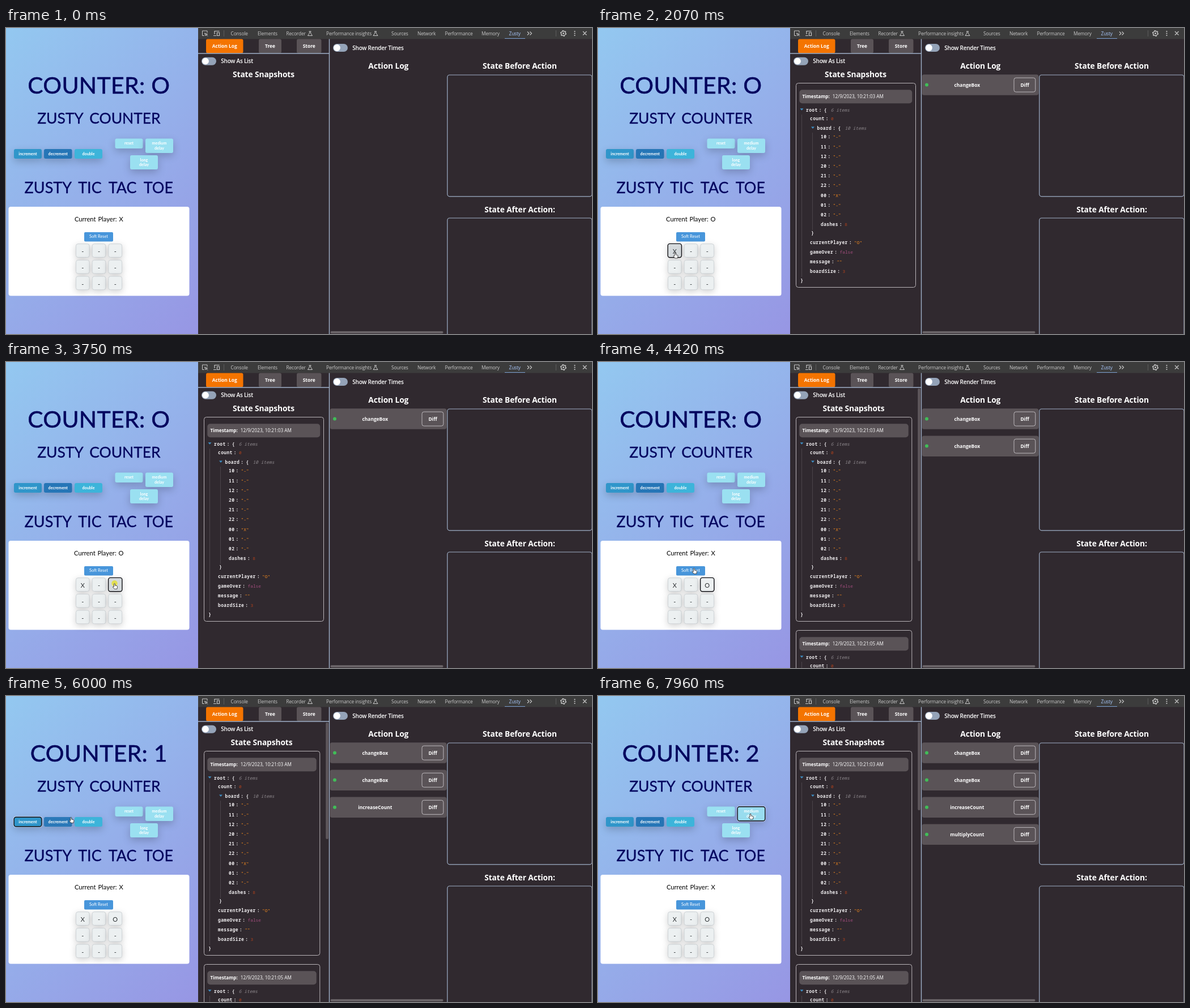
Animation, 1034 px wide and 541 px high, one loop 8000 ms. Source, as an HTML page:

```html
<!DOCTYPE html>
<html lang="en">
<head>
<meta charset="utf-8">
<title>Zusty demo</title>
<style>
html, body { margin: 0; width: 100%; height: 100%; overflow: hidden; background: #30292f; }
#app { position: absolute; left: 0; top: 0; width: 339px; height: 541px;
  background: linear-gradient(135deg, #93c8f0, #9796e4); }
svg { position: absolute; left: 0; top: 0; display: block; }
text { white-space: pre; }
.ui { font-family: "Open Sans", "Noto Sans", sans-serif; fill: #fff; }
.b { font-weight: 700; }
.sb { font-weight: 600; }
.hand { font-family: Lato, sans-serif; }
.big { fill: #03045e; stroke: #03045e; stroke-linejoin: round; }
.mono { font-family: "Noto Sans Mono", "DejaVu Sans Mono", monospace; font-size: 7.9px; }
.key { fill: #f0eef0; font-weight: 600; letter-spacing: .4px; }
.val { font-weight: 500; }
.tab { letter-spacing: -.15px; }
.mid { text-anchor: middle; }
.btn { filter: drop-shadow(0 5px 7px rgba(0, 0, 0, .2)); }
.cell { filter: drop-shadow(0 3px 6px rgba(0, 0, 0, .18)); }
.icon { fill: none; stroke: #c7c7c7; }
</style>
</head>
<body>
<div id="app"></div>
<svg id="stage" width="1034" height="541" viewBox="0 0 1034 541"></svg>
<script>
const stage = document.getElementById('stage');
const $ = id => document.getElementById(id);
const LINE = '#9fb0c8', GREY = '#5a5357';

const rect = (x, y, w, h, r, fill, more = '') =>
  `<rect x="${x}" y="${y}" width="${w}" height="${h}" rx="${r}" fill="${fill}" ${more}/>`;
const frame = (x, y, w, h, r, color, width = 1, more = '') =>
  rect(x, y, w, h, r, 'none', `stroke="${color}" stroke-width="${width}" ${more}`);
const path = (d, more = '') => `<path d="${d}" ${more}/>`;
// y is the middle of the capital letters
const text = (x, y, size, cls, str, more = '') =>
  `<text x="${x}" y="${y + size * 0.36}" font-size="${size}" class="${cls}" ${more}>${str}</text>`;

// Counter and game page
const buttons = [
  { x: 14, y: 214, w: 49, h: 17, fill: '#3096ca', label: ['increment'] },
  { x: 67, y: 214, w: 49.5, h: 17, fill: '#2676b7', label: ['decrement'] },
  { x: 121, y: 214, w: 49, h: 17, fill: '#3db4da', label: ['double'] },
  { x: 192.5, y: 195.5, w: 49, h: 17.5, fill: '#9ae0f1', label: ['reset'] },
  { x: 246, y: 195.5, w: 49, h: 25.5, fill: '#9ae0f1', label: ['medium', 'delay'] },
  { x: 219, y: 225, w: 49, h: 25, fill: '#9ae0f1', label: ['long', 'delay'] }
];
const softReset = { x: 138, y: 361, w: 51, h: 16.5 };
const cells = Array.from({ length: 9 }, (_, i) =>
  ({ x: 123 + i % 3 * 28.7, y: 381.2 + Math.floor(i / 3) * 28.7, w: 24.7, h: 24.7 }));
const targets = [...buttons, ...cells, softReset];
const INCREMENT = 0, DOUBLE = 2, MEDIUM = 4, CELL = 6;
// The zero is as wide as a capital O
const counts = ['O', 'O', 'O', '1', '2'];

function page() {
  const title = (y, size, stroke, str, more = '') =>
    text(163.8, y, size, 'hand big mid', str, `stroke-width="${stroke}" ${more}`);
  let out = title(101.5, 41, 0.5, 'COUNTER: O', 'id="count" letter-spacing=".3"') +
    title(159.5, 26.5, 0.3, 'ZUSTY COUNTER', 'word-spacing="5" letter-spacing="-.1"') +
    title(282.5, 27, 0.3, 'ZUSTY TIC TAC TOE', 'word-spacing="6"');
  buttons.forEach((b, i) => {
    out += rect(b.x, b.y, b.w, b.h, 3, b.fill, `id="t${i}" class="btn"`);
    b.label.forEach((str, k) => {
      const y = b.y + 8.4 + k * 8.2;
      out += text(b.x + b.w / 2, y, 7.2, 'hand b mid', str, 'fill="#fff"');
    });
  });
  out += rect(4.5, 316, 319, 157.5, 4, '#fff') +
    text(163.8, 338, 11.2, 'hand mid', 'Current Player: <tspan id="player">X</tspan>', 'word-spacing="1"') +
    rect(softReset.x, softReset.y, softReset.w, softReset.h, 2, '#4896db') +
    text(163.5, 368.7, 7.4, 'hand mid', 'Soft Reset', 'fill="#fff"');
  cells.forEach((c, i) => {
    out += rect(c.x + 0.5, c.y + 0.5, c.w - 1, c.h - 1, 3.5, '#ecf0f1',
      `id="t${CELL + i}" class="cell" stroke="#cdd2d5"`) +
      text(c.x + c.w / 2, c.y + 14, 11, 'hand mid', '-', `id="mark${i}" fill="#2c3033"`);
  });
  return out + `<g id="focus">${frame(0, 0, 0, 0, 4, '#fff', 0.7, 'id="halo" stroke-opacity=".7"')}` +
    `${frame(0, 0, 0, 0, 3.5, '#101014', 1.4, 'id="ring"')}</g>`;
}

// Developer tools header
function toolbar() {
  const tabs = [['Console', 396.5], ['Elements', 444], ['Recorder', 494.5], ['Performance insights', 565],
    ['Sources', 680], ['Network', 726], ['Performance', 774.5], ['Memory', 839]];
  const flask = x => path(`M${x + 2} 6h4M${x + 3} 6v3l-3 4.5h8l-3-4.5v-3`, 'class="icon"');
  let out = rect(339, 0, 695, 19.5, 0, '#3c3c3c');
  for (const [str, x] of tabs) out += text(x, 10, 8.4, 'ui tab', str, 'style="fill:#c9c9c9"');
  return out + text(887.5, 10, 8.4, 'ui tab', 'Zusty', 'style="fill:#a8c7fa"') +
    rect(880, 18, 36, 1, 0, '#7c9fd0') + flask(532.5) + flask(648) +
    path('M350 13.5h-3.5v-8.5h8.5v3.5M350.5 9l5 2-2.2.8-.8 2.2zM353 11.5l3 3', 'class="icon"') +
    path('M368 11v-5.5h8.5M366 13.5h5M372.5 8h4v5.5h-4z', 'class="icon" stroke-width="1.2"') +
    path('M384.5 4v11M970.5 4v11', 'class="icon" style="stroke:#5c5c5c"') +
    path('M920 6.5l3 3-3 3M924.5 6.5l3 3-3 3M1018 6l6.5 6.5M1024.5 6l-6.5 6.5', 'class="icon" stroke-width="1.2"') +
    '<circle cx="983.5" cy="9.5" r="4" class="icon" stroke-width="1.4"/>' +
    '<circle cx="983.5" cy="9.5" r="5" class="icon" stroke-width="1.2" stroke-dasharray="2.2 3.036"/>' +
    '<circle cx="983.5" cy="9.5" r="1.4" fill="#c7c7c7"/>' +
    [6, 9.5, 13].map(y => `<circle cx="1003.5" cy="${y}" r="1.1" fill="#c7c7c7"/>`).join('');
}

const heading = (x, y, str, more = '') =>
  text(x, y, 13.8, 'ui b mid', str, `letter-spacing="-.12" ${more}`);

function panels() {
  const tab = (x, w, str, fill) => rect(x, 19.5, w, 25, 3, fill) + text(x + w / 2, 32, 8.4, 'ui b mid', str);
  const toggle = (x, y, str) => rect(x, y - 7, 26, 14, 7, '#94a3b8') +
    `<circle cx="${x + 7}" cy="${y}" r="5.9" fill="#fff"/>` +
    text(x + 34.3, y, 10, 'ui sb', str, 'letter-spacing="-.25"');
  return tab(353, 65.5, 'Action Log', '#f47400') + tab(446, 40, 'Tree', GREY) + tab(513, 43.5, 'Store', GREY) +
    path('M339 45h231M570.5 19.5v521.5', `fill="none" stroke="${LINE}" stroke-width="1.4"`) +
    toggle(345, 58.7, 'Show As List') + toggle(577, 35, 'Show Render Times') +
    heading(454.5, 82.5, 'State Snapshots', 'id="snapTitle"') +
    heading(674.8, 67.3, 'Action Log') + heading(906.5, 67.3, 'State Before Action') +
    heading(906.5, 320.7, 'State After Action:') +
    frame(778.8, 83, 255.2, 214.8, 4, LINE, 1.2) + frame(778.8, 336, 255.2, 230, 4, LINE, 1.2) +
    rect(572.5, 536, 199, 4, 2, '#696367');
}

// Stored state shown as a tree
function snapshot(id, dy, time) {
  const mono = (x, y, cls, str, more = '') => text(x, y, 7.9, 'mono ' + cls, str, more);
  const colors = { s: '#fd8f1f', n: '#b0421c', b: '#a14c7c' };
  const row = (x, y, key, value, kind) => {
    const end = x + key.length * 5.14;
    return mono(x, y, 'key', key) + mono(end + 2.1, y, 'key', ':') +
      (kind ? mono(end + 11.3, y, 'val', value, `fill="${colors[kind]}"`)
        : mono(end + 11.3, y, 'key', '{') +
          mono(end + 23.3, y, '', value, 'fill="#8d888c" font-style="italic"') +
          path(`M${x - 10.5} ${y - 2.8}h6l-3 3.6z`, 'fill="#3f90c6"'));
  };
  const board = ['10', '11', '12', '20', '21', '22', '00', '01', '02'];
  return `<g id="${id}" transform="translate(0 ${dy})">` +
    frame(349.5, 97.5, 211, 361, 4, '#b9b4b8', 1, 'class="card"') +
    rect(355.3, 109.3, 199, 24, 5, GREY, 'class="bar"') +
    text(360.6, 121.5, 8.2, 'ui b', 'Timestamp:') +
    text(413.8, 121.5, 8.2, 'ui', `12/9/2023, ${time} AM`) +
    path('M359.5 153v287M378.5 185v172', 'stroke="#4b444a"') +
    row(367, 145, 'root', '6 items') + row(374, 160, 'count', '0', 'n') +
    row(386.5, 177.3, 'board', '10 items') +
    board.map((key, i) => row(393, 192.5 + i * 17.2, key, key === '00' ? '"X"' : '"-"', 's')).join('') +
    row(393, 347, 'dashes', '8', 'n') + mono(376.3, 362, 'key', '}') +
    row(374, 379, 'currentPlayer', '"O"', 's') + row(374, 396, 'gameOver', 'false', 'b') +
    row(374, 413, 'message', '""', 's') + row(374, 430.5, 'boardSize', '3', 'n') +
    mono(357.3, 446, 'key', '}') + '</g>';
}

const actions = ['changeBox', 'changeBox', 'increaseCount', 'multiplyCount'];
const logRow = (name, i) => {
  const y = 82.3 + i * 48.1;
  return `<g id="log${i}">` + rect(571.5, y, 206, 36.5, 4, GREY) +
    `<circle cx="580" cy="${y + 18.2}" r="3" fill="#41bd58"/>` +
    text(651.3, y + 18.2, 8.4, 'ui b mid', name) +
    frame(734, y + 5.8, 37.8, 25, 3.5, '#bdb8bc') +
    text(753, y + 18.2, 8.4, 'ui b mid', 'Diff') + '</g>';
};

const pointers = '<circle id="click" r="5.2" fill="#e8e01c" fill-opacity=".72"/>' +
  path('M0 0v8.5l2-1.8 1.3 3 1.4-.6-1.3-2.9h2.7z', 'id="arrow" fill="#fff" stroke="#222" stroke-width=".7"') +
  path('M-1 .8q1-1.4 2 0v3l3 .6q1.2.3 1.1 1.6l-.7 4h-4.6l-3-3.6q.5-1.3 2.2-.2z',
    'id="hand" fill="#fff" stroke="#222" stroke-width=".8"');

stage.innerHTML = page() + toolbar() + panels() + snapshot('snap1', 0, '10:21:03') +
  snapshot('snap2', 377, '10:21:05') + actions.map(logRow).join('') +
  rect(564.3, 47, 4.4, 305, 2, '#5f585d', 'id="thumb"') + pointers;

// Pointer moves: start, end, steps, x, y, easing
const smooth = u => u * u * (3 - 2 * u), out = u => 1 - (1 - u) ** 2, slowIn = u => u ** 1.4;
const start = [1000, 531];
const moves = [
  [380, 1140, 12, 288, 383, smooth],
  [1200, 1610, 7, 136, 397, out],
  [2400, 3140, 12, 190, 392, smooth],
  [3210, 3280, 2, 191.5, 391.3, out],
  [4280, 5040, 12, 50, 219, smooth],
  [5450, 5930, 8, 102, 217, slowIn],
  [6000, 6000, 1, 114.8, 214.3, out],
  [6060, 6470, 7, 149, 223, out],
  [7010, 7490, 8, 245, 208, smooth],
  [7560, 7690, 3, 269, 208, out]
];
// Mouse presses: down, up, pressed target
const presses = [
  [1940, 2070, CELL], [3750, 3880, CELL + 2], [5310, 5380, INCREMENT],
  [6740, 6880, DOUBLE], [7890, 7960, MEDIUM]
];
const thumbHeights = [0, 0, 305, 206, 155];

function pointerAt(t) {
  let [x, y] = start;
  for (const [t0, t1, n, tx, ty, ease] of moves) {
    if (t < t0) break;
    const step = t >= t1 ? n : Math.floor((t - t0) / (t1 - t0) * (n - 1) + 0.001) + 1;
    const u = ease(step / n);
    x += (tx - x) * u;
    y += (ty - y) * u;
  }
  return [x, y];
}

const show = (id, on) => { $(id).style.display = on ? '' : 'none'; };
const attrs = (el, values) => { for (const k in values) el.setAttribute(k, values[k]); };

function render(t) {
  const done = Math.min(4, presses.filter(p => t >= p[1]).length);
  $('count').textContent = 'COUNTER: ' + counts[done];
  $('player').textContent = done === 1 ? 'O' : 'X';
  $('mark0').textContent = done > 0 ? 'X' : '-';
  $('mark2').textContent = done > 1 ? 'O' : '-';
  actions.forEach((_, i) => show('log' + i, done > i));
  show('snap1', done > 0);
  show('snap2', done > 1);
  show('thumb', done > 1);
  $('thumb').setAttribute('height', thumbHeights[done]);
  const narrow = done > 1;
  $('snapTitle').setAttribute('x', narrow ? 451 : 454.5);
  stage.querySelectorAll('.card').forEach(el => el.setAttribute('width', narrow ? 204.3 : 211));
  stage.querySelectorAll('.bar').forEach(el => el.setAttribute('width', narrow ? 192.5 : 199));

  const [x, y] = pointerAt(t);
  const visible = t >= 380;
  const hover = targets.findIndex(b => x >= b.x && x <= b.x + b.w && y >= b.y && y <= b.y + b.h);
  buttons.forEach((b, i) => $('t' + i).setAttribute('fill-opacity', hover === i ? 0.95 : 1));
  cells.forEach((_, i) => $('t' + (CELL + i)).setAttribute('fill', hover === CELL + i ? '#d5dadd' : '#ecf0f1'));

  const pressed = presses.filter(p => t >= p[0]).pop();
  show('focus', pressed);
  if (pressed) {
    const b = targets[pressed[2]];
    const box = d => ({ x: b.x - d, y: b.y - d, width: b.w + 2 * d, height: b.h + 2 * d });
    attrs($('ring'), box(-0.2));
    attrs($('halo'), box(0.8));
  }
  show('click', pressed && t < pressed[1]);
  show('hand', visible && hover >= 0);
  show('arrow', visible && hover < 0);
  for (const id of ['click', 'hand', 'arrow']) $(id).setAttribute('transform', `translate(${x} ${y})`);
}

const began = performance.now();
function tick() {
  render((performance.now() - began) % 8000);
  requestAnimationFrame(tick);
}
tick();
</script>
</body>
</html>
```
